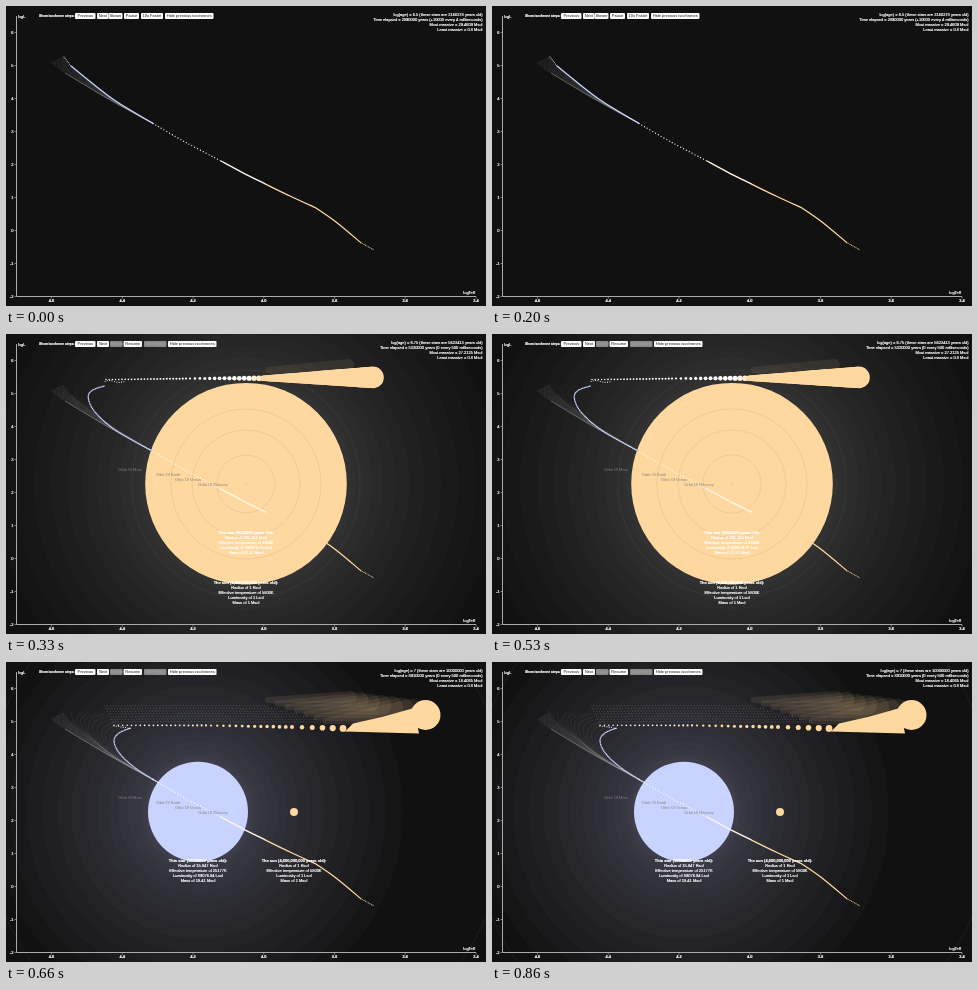
Recreate the animation shown at these times as an HTML page. Size 480 px wide and 300 px high, loop 990 ms.

```html
<!DOCTYPE html>
<html lang="en">
<head>
<meta charset="utf-8">
<title>Stellar isochrones</title>
<style>
html, body { margin: 0; width: 100%; height: 100%; overflow: hidden; background: #111; }
svg { display: block; width: 100vw; height: 100vh; }
text { font: 4px "Liberation Sans", Arial, sans-serif; fill: #fff; stroke: #fff; stroke-width: .2; }
.bold { font-weight: bold; }
.title { font-size: 3.25px; }
.orbit { fill: none; stroke: #806f58; stroke-opacity: .2; stroke-width: .7; }
.label { fill: #85817d; stroke: none; }
.on { fill: #111; stroke: none; }
.off { fill: #a5a5a5; stroke: none; }
.scene { visibility: hidden; animation: show 990ms step-end infinite; }
@keyframes show {
  0% { visibility: visible; }
  33.3333% { visibility: hidden; }
}
</style>
</head>
<body>
<svg id="stage" viewBox="0 0 480 300"></svg>
<script>
const stage = document.getElementById("stage");
const PEACH = "#ffd8a0", BLUE = "#c8d4ff", WHITE = "#fff";

function add(parent, tag, attrs = {}, content = "") {
  const el = document.createElementNS("http://www.w3.org/2000/svg", tag);
  for (const key in attrs) el.setAttribute(key, attrs[key]);
  el.textContent = content;
  parent.appendChild(el);
  return el;
}

const mix = (a, b, t) => a + (b - a) * t;
const blend = (from, to, t) => from.map((p, i) => p.map((v, j) => mix(v, to[i][j], t)));

function label(g, x, y, content, anchor = "middle", cls = "") {
  add(g, "text", { x, y, "text-anchor": anchor, class: cls }, content);
}

function circle(g, cx, cy, r, fill, extra = {}) {
  add(g, "circle", { cx, cy, r, fill, ...extra });
}

// Smooth path through the points
function curve(g, pts, stroke, width, dash = "none", opacity = 1) {
  let d = "M" + pts[0];
  for (let i = 0; i < pts.length - 1; i++) {
    const a = pts[Math.max(i - 1, 0)], b = pts[i], c = pts[i + 1];
    const e = pts[Math.min(i + 2, pts.length - 1)];
    d += `C${b[0] + (c[0] - a[0]) / 6},${b[1] + (c[1] - a[1]) / 6} ` +
         `${c[0] - (e[0] - b[0]) / 6},${c[1] - (e[1] - b[1]) / 6} ${c}`;
  }
  add(g, "path", { d, fill: "none", stroke, opacity, "stroke-width": width,
    "stroke-dasharray": dash, "stroke-linecap": dash === "none" ? "butt" : "round" });
}

// Row of circles whose radius grows from start to end: [x, y, r]
function row(g, from, to, count, power, fill) {
  for (let i = 0; i <= count; i++) {
    const t = i / count, x = mix(from[0], to[0], t);
    circle(g, x, mix(from[1], to[1], t), mix(from[2], to[2], t ** power),
      typeof fill === "function" ? fill(x) : fill);
  }
}

// Upper main sequence, hot tip first
const zams = [[46, 57], [52, 62], [59, 67], [78, 78.5], [105, 94.5], [147, 117.5]];
const young = [[58, 51], [61, 55], [65, 60], [81, 73], [109, 94.5], [147, 117.5]];
const middle = [[98, 52], [86, 56.5], [82.3, 64], [89, 78], [110, 96.5], [147, 117.5]];
const old = [[124, 66.3], [113, 71], [108, 79], [114, 92], [130, 106.5], [153, 121]];

function ghosts(g, from, to, count, opacity) {
  for (let i = 0; i < count; i++)
    curve(g, blend(from, to, i / count), "#999", .7, "0 1.7", opacity);
}

function fan(g) {
  ghosts(g, zams, young, 9, .4);
  curve(g, zams.slice(2), "#b4b4b8", .8, "none", .5);
}

function lowerSequence(g) {
  curve(g, [[147, 117.5], [180, 136.5], [215, 155]], WHITE, 1.3, "0 3.2");
  curve(g, [[215, 155], [236, 166.3], [260, 178.3]], "#fff5e8", 1.4);
  curve(g, [[260, 178.3], [284, 190], [310, 202]], PEACH, 1.3);
  curve(g, [[310, 202], [330, 216], [355, 236.8]], PEACH, 1.3);
  curve(g, [[355, 236.8], [361, 240], [367, 243.3]], "#e0bd8c", 1.2, "0 1.7");
}

// Stacked discs, packed closer towards the star
function glow(g, cx, cy, inner, outer, steps, alpha, tint) {
  for (let i = 0; i < steps; i++)
    circle(g, cx, cy, mix(inner, outer, (i / (steps - 1)) ** 1.5), tint, { "fill-opacity": alpha });
}

function starInfo(g, x, y, lines) {
  lines.forEach((line, i) => label(g, x, y + 5 * i, line, "middle", i ? "" : "bold"));
}

const sunInfo = ["The sun (4,600,000,000 years old):", "Radius of 1 Rsol",
  "Effective temperature of 5800K", "Luminosity of 1 Lsol", "Mass of 1 Msol"];

function orbitLabels(g) {
  ["Mars", "Earth", "Venus", "Mercury"].forEach((name, i) =>
    label(g, [124, 162, 182, 207][i], 136.5 + 5 * i, "Orbit Of " + name, "middle", "label"));
}

function button(g, x, width, content, disabled) {
  add(g, "rect", { x, y: 7, width, height: 6, rx: 1, fill: disabled ? "#8b8b8b" : WHITE });
  label(g, x + width / 2, 11.3, content, "middle", disabled ? "off" : "on");
}

function status(g, lines) {
  lines.forEach((line, i) => label(g, 476.5, 10.4 + 5 * i, line, "end"));
}

function axes(g) {
  add(g, "path", { d: "M10.5 10V290.5H470", fill: "none", stroke: "#aaa", "stroke-width": 1 });
  for (let i = 0; i <= 8; i++) {
    const y = 26.5 + 33 * i;
    add(g, "path", { d: `M8.5 ${y}h2`, stroke: "#aaa", "stroke-width": .7 });
    label(g, 7.5, y + 1.3, 6 - i, "end");
  }
  for (let i = 0; i <= 6; i++) {
    const x = 45.5 + 70.75 * i;
    add(g, "path", { d: `M${x} 290.5v2`, stroke: "#aaa", "stroke-width": .7 });
    label(g, x, 296.3, (4.6 - .2 * i).toFixed(1), "middle", "bold");
  }
  label(g, 12, 11.5, "logL", "start");
  label(g, 469, 288.3, "logTeff", "end");
  label(g, 33, 11.3, "Show isochrone steps:", "start", "bold title");
}

function pausedButtons(g) {
  button(g, 69, 20.5, "Previous");
  button(g, 91, 12, "Next");
  button(g, 104, 12.5, "Slower", true);
  button(g, 117.5, 18.5, "Resume");
  button(g, 138, 22.5, "10x Faster", true);
  button(g, 162, 48.5, "Hide previous isochrones");
}

function runningScene(g) {
  fan(g);
  curve(g, young.slice(0, 3), WHITE, 1, "0 1.8");
  curve(g, young.slice(2), BLUE, 1.3);
  lowerSequence(g);
  button(g, 69, 20.5, "Previous");
  button(g, 91, 11.5, "Next");
  button(g, 102.5, 14, "Slower");
  button(g, 118, 15, "Pause");
  button(g, 135, 22, "10x Faster");
  button(g, 159, 48.5, "Hide previous isochrones");
  status(g, ["log(age) = 6.5 (these stars are 3160278 years old)",
    "Time elapsed = 2890000 years (+10000 every 4 milliseconds)",
    "Most massive = 29.4609 Msol", "Least massive = 0.8 Msol"]);
}

function giantScene(g) {
  glow(g, 240, 149.7, 106, 250, 12, .0115, WHITE);
  circle(g, 240, 149.7, 100.8, PEACH);
  for (const r of [29, 54, 75, 114]) add(g, "circle", { cx: 240, cy: 150, r, class: "orbit" });
  circle(g, 240, 150, .5, "#c9aa7d");
  fan(g);
  ghosts(g, young, middle, 3, .14);
  const shade = add(g, "g", { opacity: .08 });
  row(shade, [262, 36, 3], [342, 31, 6], 40, 1, PEACH);
  curve(g, middle, BLUE, 1.5, "0 1.5");
  lowerSequence(g);
  curve(g, [[99, 47.5], [104, 46.5], [112, 48.3], [118, 47.8]], WHITE, 1.1, "0 2.4");
  row(g, [100, 45.6, .75], [180, 44.6, 1.05], 25, 1, WHITE);
  row(g, [184, 44.5, 1.1], [253, 44.2, 2.8], 14, .9, x => x > 244 ? "#ffecd2" : WHITE);
  row(g, [257, 44.2, 2.8], [367, 43.4, 10.8], 70, 1, PEACH);
  orbitLabels(g);
  starInfo(g, 240, 200.4, ["This star (5600000 years old):", "Radius of 291.162 Rsol",
    "Effective temperature of 4160K", "Luminosity of 209979.78 Lsol", "Mass of 27.21 Msol"]);
  starInfo(g, 240, 250.4, sunInfo);
  pausedButtons(g);
  status(g, ["log(age) = 6.75 (these stars are 5623413 years old)",
    "Time elapsed = 5330000 years (0 every 500 milliseconds)",
    "Most massive = 27.2125 Msol", "Least massive = 0.8 Msol"]);
}

function blueScene(g) {
  glow(g, 192, 150, 54, 205, 14, .02, BLUE);
  add(g, "circle", { cx: 240, cy: 150, r: 262, class: "orbit" });
  circle(g, 192, 149.8, 50, BLUE);
  circle(g, 288, 150, 4, PEACH);
  fan(g);
  ghosts(g, young, middle, 5, .28);
  ghosts(g, middle, old, 6, .32);
  for (let i = 0; i < 7; i++) {
    const t = i / 6, y = mix(44, 60, t);
    curve(g, [[mix(99, 107, t), y], [180, y - .4], [mix(262, 320, t), y]], "#999", 1, "0 2.8", .45);
    const shade = add(g, "g", { opacity: .09 });
    row(shade, [mix(262, 320, t), mix(38, 59, t), 3], [mix(345, 406, t), mix(35, 51, t), mix(6, 14, t)], 30, 1, PEACH);
  }
  curve(g, old, BLUE, 1.5, "0 1.5");
  lowerSequence(g);
  curve(g, [[124, 66.3], [116, 65], [107, 63.8]], WHITE, 1.1, "0 2.3");
  row(g, [108, 63.3, .75], [200, 63.4, 1.05], 21, 1, x => x > 165 ? "#ffecd2" : WHITE);
  row(g, [205, 63.5, 1.1], [286, 65, 2], 13, 1, PEACH);
  row(g, [296, 65.2, 2.2], [337, 66.4, 3.4], 4, 1, PEACH);
  add(g, "path", { d: "M339 69.5L347 61.5L376 55L408 46L413 71.5Z", fill: PEACH });
  circle(g, 419.5, 53, 15, PEACH);
  orbitLabels(g);
  starInfo(g, 192, 200.4, ["This star (10000000 years old):", "Radius of 15.847 Rsol",
    "Effective temperature of 25177K", "Luminosity of 89076.94 Lsol", "Mass of 18.41 Msol"]);
  starInfo(g, 288, 200.4, sunInfo);
  pausedButtons(g);
  status(g, ["log(age) = 7 (these stars are 10000000 years old)",
    "Time elapsed = 8910000 years (0 every 500 milliseconds)",
    "Most massive = 18.4065 Msol", "Least massive = 0.8 Msol"]);
}

[runningScene, giantScene, blueScene].forEach((draw, i) => {
  const g = add(stage, "g", { class: "scene", style: `animation-delay:${i ? i * 330 - 990 : 0}ms` });
  draw(g);
});
axes(add(stage, "g"));
</script>
</body>
</html>
```
